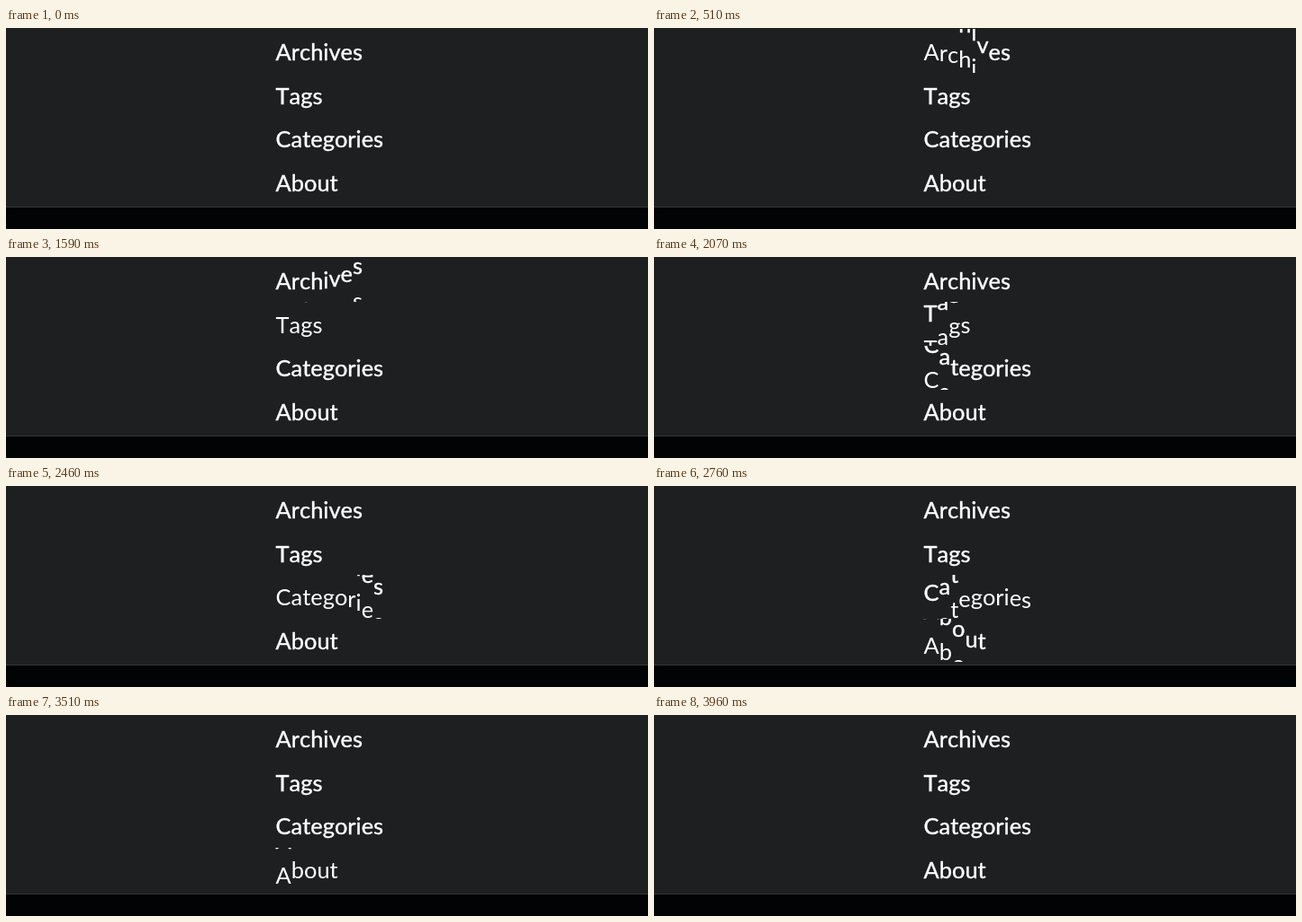
Animation, 713 px wide and 224 px high, one loop 4.29 s. Source, as an HTML page:

```html
<!DOCTYPE html>
<html lang="en">
<head>
<meta charset="utf-8">
<title>Menu</title>
<style>
  html, body {
    margin: 0;
    width: 100%;
    height: 100%;
    overflow: hidden;
    background: #1d1f21;
  }
  .footer {
    position: absolute;
    top: 199px;
    left: 0;
    right: 0;
    bottom: 0;
    border-top: 1px solid #34373a;
    background: #020304;
  }
  .row {
    position: absolute;
    left: 280px;
    width: 160px;
    overflow: hidden;
  }
  .line {
    position: absolute;
    left: 19.6px;
    white-space: nowrap;
    font: 25.4px/30px Lato, "Open Sans", sans-serif;
    -webkit-text-stroke: 0.4px #fff;
    color: #fff;
  }
  .line span {
    display: inline-block;
    text-shadow: 0 39px 0 #fff;
  }
</style>
</head>
<body>
<div class="footer"></div>
<script>
const LOOP = 4290, TICK = 30;
const TRAVEL = 39, STAGGER = 49, DURATION = 290, ASCENT = 25;

// Times are in ms; the optional rates speed up a single sweep.
const items = [
  { word: "Archives", top: 1, height: 49, baseline: 36, enter: 220, leave: 1226, leaveRate: 1.2 },
  { word: "Tags", top: 50, height: 49, baseline: 85, enter: 1226, leave: 1958, enterRate: 1.2 },
  { word: "Categories", top: 99, height: 49, baseline: 133, enter: 1958, leave: 2595 },
  { word: "About", top: 148, height: 48, baseline: 182, enter: 2595, leave: 3470 },
];

function add(parent, tag, className, style) {
  const node = document.createElement(tag);
  node.className = className;
  Object.assign(node.style, style);
  return parent.appendChild(node);
}

for (const item of items) {
  const row = add(document.body, "div", "row", { top: item.top + "px", height: item.height + "px" });
  const line = add(row, "div", "line", { top: item.baseline - item.top - ASCENT + "px" });
  item.letters = [...item.word].map(char => {
    const letter = add(line, "span", "", {});
    letter.textContent = char;
    return letter;
  });
}

const bezier = (a, b, u) => 3 * a * u * (1 - u) ** 2 + 3 * b * u * u * (1 - u) + u ** 3;

// The CSS "ease" curve, solved by bisection.
function ease(x) {
  if (x <= 0) return 0;
  if (x >= 1) return 1;
  let low = 0, high = 1;
  for (let n = 0; n < 24; n++) {
    const mid = (low + high) / 2;
    if (bezier(0.25, 0.25, mid) < x) low = mid; else high = mid;
  }
  return bezier(0.1, 1, low);
}

const sweep = (elapsed, index, rate = 1) => ease((elapsed * rate - index * STAGGER) / DURATION);

function draw(time) {
  for (const { letters, enter, leave, enterRate, leaveRate } of items) {
    letters.forEach((letter, index) => {
      const raised = sweep(Math.min(time, leave) - enter, index, enterRate);
      const lowered = sweep(time - leave, index, leaveRate);
      const shift = -TRAVEL * raised * (1 - lowered);
      letter.style.transform = `translateY(${shift.toFixed(2)}px)`;
    });
  }
}

const start = performance.now();
function frame() {
  const time = (performance.now() - start) % LOOP;
  draw(Math.floor(time / TICK) * TICK);
  requestAnimationFrame(frame);
}
frame();
</script>
</body>
</html>
```
